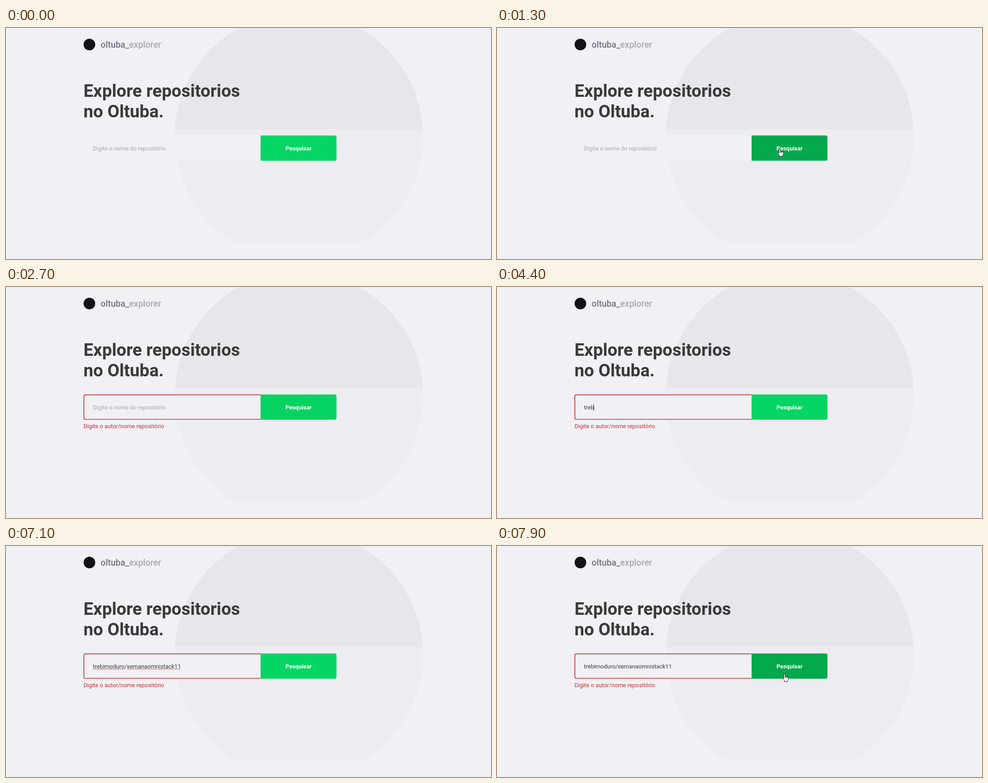
Write an HTML page with a canvas that moves like this. It is 1084x517 px and loops after 8000 ms.

```html
<!DOCTYPE html>
<html lang="pt">
<head>
<meta charset="utf-8">
<title>Explorer</title>
<style>
  html, body { margin: 0; width: 100%; height: 100%; overflow: hidden; background: #f0f0f5; }
  canvas { display: block; width: 1084px; height: 517px; }
</style>
</head>
<body>
<canvas id="stage"></canvas>
<script>
const W = 1084, H = 517, LOOP = 8000, STEP = 100;
const FONT = 'Roboto, Arial, sans-serif';
const BODY = `400 12.93px ${FONT}`;
const BG = '#f0f0f5', INK = '#3a3a3a', GREY = '#a8a8b3', RED = '#c53030';

const canvas = document.getElementById('stage');
const ctx = canvas.getContext('2d');
const dpr = window.devicePixelRatio || 1;
canvas.width = W * dpr;
canvas.height = H * dpr;

const field = { x: 173.3, y: 240.6, w: 395.7, h: 56.5 };
const button = { x: 569, y: 240.6, w: 169.6, h: 56.5 };
const user = 'trebimoduro', repo = 'semanaomnistack11';
const query = `${user}/${repo}`;
const textX = 194.3, textY = 274;

// Moments at which one more character is typed, then the rest is pasted
const keys = [3700, 4000, 4100, 4400, 4600, 4700, 4800, 5000, 5100, 5300, 5400, 6100];
const PASTE = 6600;
const caretOn = [[2900, 3400], [3700, 5900], [6100, 7100], [7600, 7800]];

// Pointer paths: [time, x, y]
const paths = [
  [[200, 156, 81], [400, 287, 134], [600, 310, 150], [1100, 579, 250],
   [1200, 612, 263], [1300, 626, 269], [1500, 626, 270], [2300, 626, 270],
   [2400, 600, 269], [2500, 572, 268]],
  [[7400, 560, 308], [7500, 590, 311], [7600, 616, 306], [7700, 634, 284],
   [7800, 637, 285], [7900, 637, 285]]
];
const arrow = new Path2D('M.5 .5V16.5L4.2 13L6.7 18.7L9 17.7L6.5 12.2H11.5Z');
const hand = new Path2D('M4 12V2a1.5 1.5 0 0 1 3 0V7.5a1.3 1.3 0 0 1 2.5 .5' +
  'a1.3 1.3 0 0 1 2.5 .7a1.2 1.2 0 0 1 2.3 .8V13L12.5 16.5V18.5H5.5V16.5L1 11.5Q.2 10 1.5 9.5T4 12Z');

const clamp = v => Math.max(0, Math.min(1, v));
const easeOut = p => 1 - (1 - clamp(p)) ** 2.4;
const within = (t, [a, b]) => t >= a && t < b;

function text(str, x, y, font, color) {
  ctx.font = font;
  ctx.fillStyle = color;
  ctx.fillText(str, x, y);
  return ctx.measureText(str).width;
}

function drawBackdrop() {
  ctx.fillStyle = BG;
  ctx.fillRect(0, 0, W, H);
  const tone = ctx.createLinearGradient(0, 0, 0, H);
  tone.addColorStop(226 / H, '#e7e6eb');
  tone.addColorStop(226 / H, '#edecf1');
  ctx.save();
  ctx.beginPath();
  ctx.rect(0, 0, W, 477);
  ctx.clip();
  ctx.beginPath();
  ctx.arc(654.5, 243, 277.5, 0, Math.PI * 2);
  ctx.fillStyle = tone;
  ctx.fill();
  ctx.restore();
}

function drawHeader() {
  ctx.beginPath();
  ctx.arc(186.4, 37, 13, 0, Math.PI * 2);
  ctx.fillStyle = '#131316';
  ctx.fill();
  const logo = `500 19.5px ${FONT}`, title = `700 38.8px ${FONT}`;
  const w = text('oltuba_', 211.6, 43.5, logo, '#737380');
  text('explorer', 211.6 + w, 43.5, logo, GREY);
  text('Explore repositorios', 173.3, 154, title, INK);
  text('no Oltuba.', 173.3, 200, title, INK);
}

function squiggle(from, to) {
  ctx.beginPath();
  for (let x = from; x <= to; x += 0.5) {
    const y = 275.7 + 0.9 * Math.sin((x - from) * Math.PI / 2);
    x === from ? ctx.moveTo(x, y) : ctx.lineTo(x, y);
  }
  ctx.strokeStyle = '#e23a3a';
  ctx.lineWidth = 0.9;
  ctx.stroke();
}

function drawField(t) {
  const { x, y, w, h } = field;
  ctx.fillStyle = BG;
  ctx.beginPath();
  ctx.roundRect(x, y, w, h, [4, 0, 0, 4]);
  ctx.fill();

  if (t >= 2100) {
    ctx.strokeStyle = RED;
    ctx.lineWidth = 1.7;
    ctx.beginPath();
    ctx.moveTo(x + w, y + 0.85);
    ctx.arcTo(x + 0.85, y + 0.85, x + 0.85, y + h, 3.2);
    ctx.arcTo(x + 0.85, y + h - 0.85, x + w, y + h - 0.85, 3.2);
    ctx.lineTo(x + w, y + h - 0.85);
    ctx.stroke();
    text('Digite o autor/nome repositório', x, 316, BODY, RED);
  }

  const count = t >= PASTE ? query.length : keys.filter(k => k <= t).length;
  const typed = query.slice(0, count);
  if (count) text(typed, textX, textY, BODY, INK);
  else text('Digite o nome do repositório', textX, textY, BODY, GREY);

  if (within(t, [6700, 7800])) {
    const width = s => ctx.measureText(s).width;
    squiggle(textX, textX + width(user));
    squiggle(textX + width(user + '/'), textX + width(query));
  }
  if (caretOn.some(span => within(t, span))) {
    ctx.fillStyle = '#222';
    ctx.fillRect(Math.floor(textX + ctx.measureText(typed).width), 262, 1, 15);
  }
}

function drawButton(t) {
  const hover = easeOut((t - 1090) / 200) - easeOut((t - 2540) / 220) + easeOut((t - 7650) / 200);
  const mix = (a, b) => Math.round(a + (b - a) * hover);
  const { x, y, w, h } = button;
  ctx.fillStyle = `rgb(${mix(5, 4)},${mix(213, 168)},${mix(98, 77)})`;
  ctx.beginPath();
  ctx.roundRect(x, y, w, h, [0, 4, 4, 0]);
  ctx.fill();
  ctx.textAlign = 'center';
  text('Pesquisar', x + w / 2, textY, `700 12.93px ${FONT}`, '#fff');
  ctx.textAlign = 'left';
}

function pointerAt(t) {
  const path = paths.find(p => t >= p[0][0] && t <= p[p.length - 1][0]);
  if (!path) return null;
  const i = Math.max(1, path.findIndex(p => p[0] >= t));
  const [t0, x0, y0] = path[i - 1], [t1, x1, y1] = path[i];
  const k = (t - t0) / (t1 - t0);
  return { x: Math.round(x0 + (x1 - x0) * k), y: Math.round(y0 + (y1 - y0) * k) };
}

function drawPointer(t) {
  const p = pointerAt(t);
  if (!p) return;
  const over = p.x + 5 > button.x && p.y > button.y && p.y < button.y + button.h;
  const shape = over ? hand : arrow;
  ctx.save();
  ctx.translate(p.x, p.y);
  ctx.fillStyle = '#fff';
  ctx.strokeStyle = '#111';
  ctx.lineWidth = 1;
  ctx.lineJoin = 'round';
  ctx.fill(shape);
  ctx.stroke(shape);
  if (over) {
    ctx.beginPath();
    for (const x of [7, 9.5, 12]) {
      ctx.moveTo(x, 8);
      ctx.lineTo(x, 10.5);
    }
    ctx.stroke();
  }
  ctx.restore();
}

const start = performance.now();
function frame(now) {
  const t = Math.floor((Math.max(0, now - start) % LOOP) / STEP) * STEP;
  ctx.setTransform(dpr, 0, 0, dpr, 0, 0);
  drawBackdrop();
  drawHeader();
  drawField(t);
  drawButton(t);
  drawPointer(t);
  requestAnimationFrame(frame);
}
frame(start);
</script>
</body>
</html>
```
